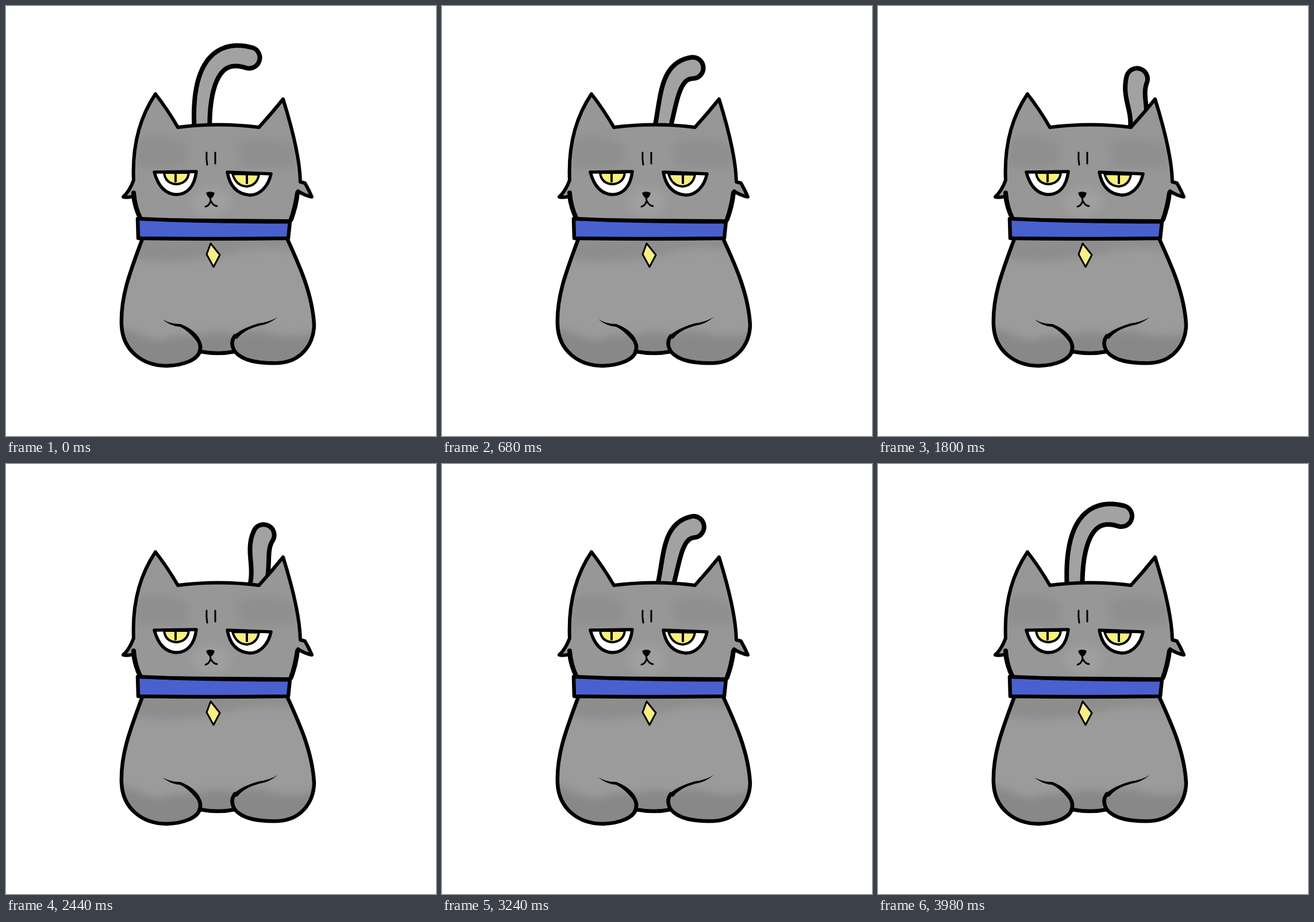
These frames come from a looping animation (748 by 748 pixels, 4000 ms). An HTML page:

```html
<!DOCTYPE html>
<html lang="en">
<head>
<meta charset="utf-8">
<title>Grumpy cat</title>
<style>
html, body { margin: 0; width: 100%; height: 100%; overflow: hidden; background: #fff; }
svg { display: block; width: 100vw; height: 100vh; }
.line { fill: none; stroke: #000; stroke-width: 6.5; stroke-linecap: round; stroke-linejoin: round; }
.thin { stroke-width: 3; }
.dark { fill: #888; }
.light { fill: #a3a3a3; }
</style>
</head>
<body>
<svg viewBox="0 0 748 748">
  <defs>
    <filter id="soft" x="-50%" y="-50%" width="200%" height="200%"><feGaussianBlur stdDeviation="7"/></filter>
    <path id="head" d="M260 153 Q281 180 299 211 Q370 202 440 211 Q461 188 482 162 Q511 255 512 306 L520 308 Q527 320 532 332 Q520 330 508 322 Q506 350 495 374 L234 372 Q224 352 221 331 Q212 334 204 332 Q215 322 222 303 Q218 215 260 153Z"/>
    <path id="body" d="M239 400 C216 462 199 505 201 555 C203 600 238 626 280 626 C310 625 333 615 337 601 Q370 607 398 601 C412 618 440 622 474 621 C512 619 535 590 536 555 C533 500 510 450 487 400Z"/>
    <path id="eyeL" d="M258 289 L331 288 C328 314 315 328 296 328 C275 327 264 311 258 289Z"/>
    <path id="eyeR" d="M385 289 L461 292 C456 315 441 329 424 329 C401 327 389 312 385 289Z"/>
    <clipPath id="headClip"><use href="#head"/></clipPath>
    <clipPath id="bodyClip"><use href="#body"/></clipPath>
    <clipPath id="eyeClip"><use href="#eyeL"/><use href="#eyeR"/></clipPath>
  </defs>

  <path id="tail" class="line" style="fill:#a2a2a2;stroke-width:8"/>

  <use href="#body" fill="#9b9b9b"/>
  <g clip-path="url(#bodyClip)" filter="url(#soft)">
    <path class="dark" d="M220 400H510V425Q440 415 390 430Q300 452 225 440Z" opacity=".7"/>
    <path class="dark" d="M190 555Q240 575 265 582Q300 570 340 572Q370 562 400 572Q430 560 470 572Q510 580 545 565V640H190Z"/>
  </g>
  <use href="#body" class="line"/>
  <path class="line" d="M336 603Q342 590 331 577M398 601Q389 586 398 574"/>
  <path d="M272 545Q288 554 303 553Q327 562 337 579L329 580Q317 565 303 558Q286 557 272 545Z"/>
  <path d="M473 541Q457 554 441 556Q414 563 402 579L393 577Q405 562 440 552Q458 550 473 541Z"/>

  <use href="#head" fill="#979797"/>
  <g clip-path="url(#headClip)" filter="url(#soft)">
    <path class="dark" d="M225 235Q270 215 320 245L310 280H225ZM400 240Q450 220 505 245V280H410Z" opacity=".5"/>
    <ellipse class="light" cx="357" cy="340" rx="34" ry="25" opacity=".7"/>
  </g>
  <use href="#head" class="line" style="stroke-width:6"/>
  <path class="line" d="M222 325Q224 350 234 370M507 325Q503 352 496 371" style="stroke-width:8"/>

  <g fill="#fff"><use href="#eyeL"/><use href="#eyeR"/></g>
  <g class="line" style="stroke-width:4;fill:#f8ef7c">
    <path d="M275 290Q277 309 297 310Q316 308 318 290Z"/>
    <path d="M394 292Q400 313 419 314Q437 312 440 293Z"/>
    <path d="M295 291V305M419 294V308"/>
  </g>
  <g clip-path="url(#eyeClip)">
    <g id="lid"><path fill="#979797" d="M240 220H480V285H240Z"/><path class="line" d="M250 285H480"/></g>
  </g>
  <g class="line" style="stroke-width:5.5"><use href="#eyeL"/><use href="#eyeR"/></g>

  <path d="M348 325Q355 321 363 325Q361 334 355 335Q350 332 348 325Z"/>
  <path class="line thin" d="M355 333L356 339Q353 348 347 349M356 339Q361 348 367 348M349 255Q348 265 350 276M364 255V274"/>

  <path class="line" style="fill:#4961cf" d="M229 370Q360 376 494 375L491 404Q360 406 230 404Z"/>
  <path class="line thin" style="fill:#f9ed86" d="M356 413L372 433 361 454 349 432Z"/>
</svg>
<script>
const tail = document.getElementById('tail');
const lid = document.getElementById('lid');

// Bezier centre line of the tail at both ends of the swing, base first
const nearEnd = [[341, 215], [338, 140], [355, 70], [423, 90]];
const farEnd = [[464, 215], [465, 182], [446, 162], [452, 129]];
const baseRadius = 13.3, tipRadius = 18.5, steps = 24;

const mix = (a, b, k) => a.map((v, i) => v + (b[i] - v) * k);

// Point and direction on a curve, by repeated mixing
function along(curve, u) {
  const reduce = pts => pts.slice(1).map((p, i) => mix(pts[i], p, u));
  const [a, b] = reduce(reduce(curve));
  return { at: mix(a, b, u), angle: Math.atan2(b[1] - a[1], b[0] - a[0]) };
}

function tailPath(swing) {
  const lead = swing * (1.5 - swing / 2); // the upper part runs ahead of the base
  const curve = nearEnd.map((p, i) => mix(p, farEnd[i], i ? lead : swing));
  const left = [], right = [];
  for (let i = 0; i <= steps; i++) {
    const u = i / steps;
    const { at: [x, y], angle } = along(curve, u);
    const r = baseRadius + (tipRadius - baseRadius) * u;
    const dx = Math.sin(angle) * r, dy = -Math.cos(angle) * r;
    left.push([x + dx, y + dy]);
    right.unshift([x - dx, y - dy]);
  }
  return `M${left.join('L')}A${tipRadius} ${tipRadius} 0 0 1 ${right.join('L')}`;
}

function draw() {
  const t = performance.now() % 4000;
  tail.setAttribute('d', tailPath(1 - Math.abs(1 - t / 2000)));
  const blink = t > 100 && t < 640 ? Math.sin(Math.PI * (t - 100) / 540) : 0;
  lid.setAttribute('transform', `translate(0 ${blink * 46})`);
  requestAnimationFrame(draw);
}
draw();
</script>
</body>
</html>
```
